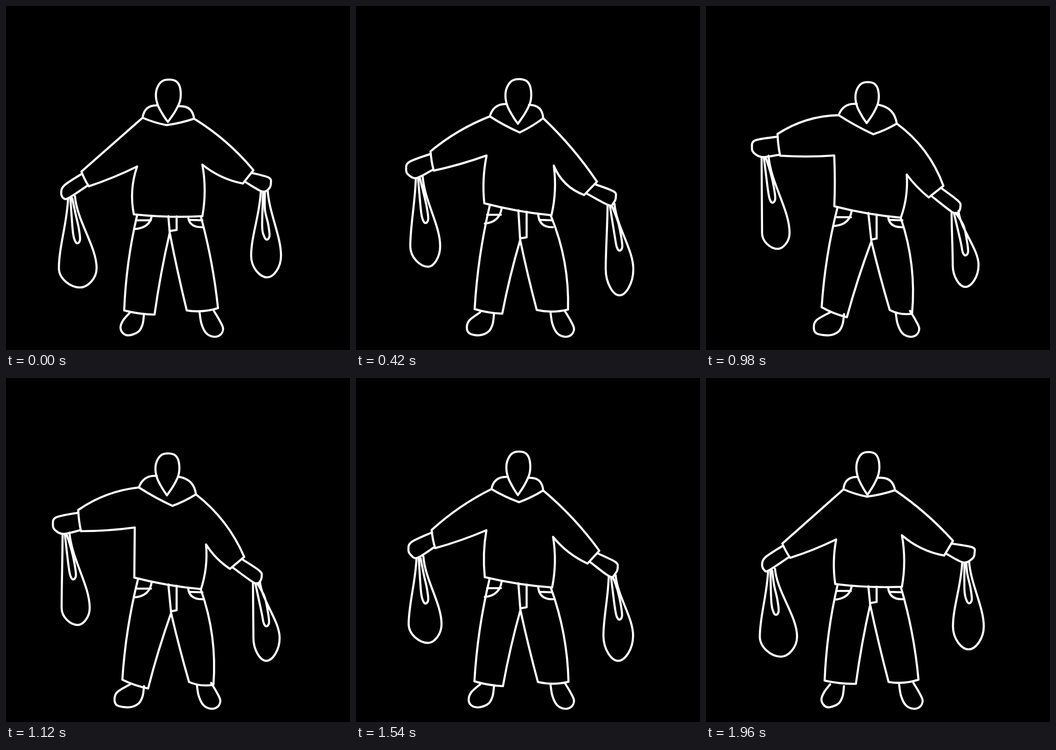
An HTML page with a canvas that plays this animation: 748x748 px, repeating every 2100 ms.

```html
<!DOCTYPE html>
<html>
<head>
<meta charset="utf-8">
<style>
html, body { margin: 0; height: 100%; overflow: hidden; background: #000; }
canvas { display: block; }
</style>
</head>
<body>
<canvas width="748" height="748"></canvas>
<script>
const ctx = document.querySelector("canvas").getContext("2d");
ctx.strokeStyle = "#fff";
ctx.lineWidth = 4.6;
ctx.lineCap = ctx.lineJoin = "round";

const stepMs = 140;
// Tilt per step: 0 is level, 4 a full lean, above 4 slightly past it.
const sway = [1, 2, 2.5, 3, 3.5, 4, 4.2, 4.3, 4, 3.5, 3, 2.5, 2, 1, 0];
let tilt = 0;

// Value at the current tilt, from its values at tilts 0 to 4.
function at(...keys) {
  const i = Math.min(3, Math.floor(tilt));
  return keys[i] + (keys[i + 1] - keys[i]) * (tilt - i);
}
const joint = (xs, ys) => [at(...xs), at(...ys)];
const shift = ([x, y], dx, dy) => [x + dx, y + dy];

// Line from p to q, bowed to the right of travel.
function edge(p, q, bow = 0) {
  const dx = q[0] - p[0], dy = q[1] - p[1], k = 2 * bow / Math.hypot(dx, dy);
  ctx.moveTo(...p);
  ctx.quadraticCurveTo((p[0] + q[0]) / 2 - dy * k, (p[1] + q[1]) / 2 + dx * k, ...q);
}

// Catmull-Rom curve through the points.
function smooth(...points) {
  const near = i => points[Math.max(0, Math.min(points.length - 1, i))];
  ctx.moveTo(...points[0]);
  for (let i = 0; i < points.length - 1; i++) {
    const [a, b, c, d] = [near(i - 1), near(i), near(i + 1), near(i + 2)];
    ctx.bezierCurveTo(
      b[0] + (c[0] - a[0]) / 6, b[1] + (c[1] - a[1]) / 6,
      c[0] - (d[0] - b[0]) / 6, c[1] - (d[1] - b[1]) / 6, ...c);
  }
}

function head() {
  const left = at(327, 326, 329, 325, 325), right = at(376, 379, 376, 380, 376);
  const top = at(161, 160, 161, 159, 164), chin = at(254, 252, 253, 256, 255);
  const p = (u, v) => [left + u * (right - left), top + v * (chin - top)];
  smooth(p(.49, 1), p(.31, .85), p(.09, .62), p(0, .4), p(.05, .2), p(.25, .04),
    p(.56, 0), p(.85, .05), p(1, .22), p(.99, .5), p(.78, .76), p(.49, 1));
}

function hood(left, right) {
  const y = at(215, 216, 217, 213, 213);
  const dip = joint([350, 349, 353, 356, 362], [258, 259, 265, 275, 278]);
  edge([328, y], left, 9);
  edge(left, dip, 1.5);
  edge(dip, right, 1.5);
  edge(right, [376, y + 2], 10);
}

function bag(top, left, right, midY, bottom, handle) {
  const side = ([x, y], wideX) => {
    const h = midY - y;
    ctx.moveTo(x, y);
    ctx.bezierCurveTo(x + .1 * (wideX - x), y + .35 * h, wideX, midY - .3 * h, wideX, midY);
    ctx.bezierCurveTo(wideX, midY + .55 * (bottom[1] - midY),
      bottom[0] + .45 * (wideX - bottom[0]), bottom[1], ...bottom);
  };
  side(shift(top, -2, 1), left);
  side(shift(top, 13, -3), right);
  const h = (dx, dy) => shift(handle, dx, dy);
  smooth(shift(top, 3, 1), h(-10, -29), h(-6, -8), handle,
    h(6, -8), h(3, -34), h(-4, -65), shift(top, 7, 1));
}

function leftHand(cuffTop, cuffEnd) {
  const tip = joint([122, 120, 119, 109, 102], [406, 406, 390, 355, 319]);
  const grip = joint([137, 137, 135, 132, 125], [418, 417, 408, 374, 339]);
  smooth(shift(cuffTop, -1, 6), shift(tip, 7, -16), tip, shift(tip, 5, 12),
    grip, shift(cuffEnd, -2, -2));
  bag(grip, at(117, 115, 111, 118, 121), at(198, 197, 189, 183, 182),
    at(562, 570, 548, 522, 500),
    joint([163, 161, 157, 157, 156], [606, 612, 585, 567, 537]),
    joint([152, 155, 151, 151, 146], [515, 516, 509, 472, 438]));
}

function rightHand(cuffTop, cuffEnd) {
  const tip = joint([584, 576, 573, 565, 556], [380, 385, 409, 415, 431]);
  const grip = joint([559, 556, 554, 549, 539], [401, 403, 430, 433, 445]);
  smooth(shift(cuffTop, -3, 6), shift(tip, -5, -12), tip, shift(tip, -5, 13),
    grip, shift(cuffEnd, 6, -3));
  bag(grip, at(537, 533, 533, 543, 538), at(604, 598, 602, 603, 595),
    at(540, 543, 548, 572, 565),
    joint([571, 568, 567, 573, 566], [590, 590, 601, 629, 615]),
    joint([572, 567, 572, 573, 566], [490, 508, 519, 532, 540]));
}

function jumper(hemL, hemR) {
  const neckL = joint([299, 297, 298, 291, 289], [242, 243, 243, 240, 238]);
  const neckR = joint([411, 409, 407, 407, 413], [244, 245, 245, 244, 253]);
  const cuffL = joint([166, 164, 167, 162, 157], [360, 360, 345, 316, 287]);
  const cuffEndL = joint([183, 180, 175, 169, 163], [391, 392, 382, 358, 333]);
  const cuffR = joint([537, 538, 534, 524, 518], [354, 357, 369, 382, 389]);
  const cuffEndR = joint([518, 515, 511, 496, 487], [386, 386, 396, 411, 415]);
  const pitL = joint([283, 285, 283, 284, 280], [351, 349, 337, 325, 325]);
  const pitR = joint([426, 427, 427, 430, 435], [342, 345, 344, 347, 362]);
  hood(neckL, neckR);
  edge(neckL, cuffL, at(0, 0, 5, 6, 9));
  edge(cuffL, cuffEndL, 1);
  edge(cuffEndL, pitL, 2);
  edge(pitL, hemL, at(4, 7, 3, 4, 0));
  edge(hemL, hemR, 3);
  edge(hemR, pitR, 5);
  edge(pitR, cuffEndR, at(7, 6, 1, 10, 4));
  edge(cuffEndR, cuffR);
  edge(cuffR, neckR, at(5, 7, 6, 5, 11));
  leftHand(cuffL, cuffEndL);
  rightHand(cuffR, cuffEndR);
}

function trousers(hemL, hemR) {
  const waist = x => [x, hemL[1] + (hemR[1] - hemL[1]) * (x - hemL[0]) / (hemR[0] - hemL[0]) + 2];
  const crotch = joint([357, 356, 358, 357, 359], [493, 493, 500, 509, 511]);
  const outerL = joint([258, 257, 257, 258, 253], [658, 662, 660, 659, 656]);
  const innerL = joint([326, 323, 321, 318, 309], [665, 671, 671, 669, 675]);
  const innerR = joint([397, 393, 398, 393, 398], [661, 662, 661, 661, 661]);
  const outerR = joint([462, 461, 463, 461, 451], [656, 657, 661, 660, 667]);
  edge(waist(at(286, 285, 290, 291, 287)), outerL, 5);
  edge(outerL, innerL, 2);
  edge(innerL, crotch, -2);
  edge(crotch, innerR, 1);
  edge(innerR, outerR, 4);
  edge(outerR, waist(424), at(5, 4, 6, 11, 11));

  const flyEnd = [371, crotch[1] - 6];
  edge(waist(353), crotch);
  edge(waist(371), flyEnd);
  edge(flyEnd, shift(crotch, 2, -4));

  const y = at(463, 466, 460, 454, 458);
  edge([285, y], [315, y]);
  ctx.moveTo(...waist(317));
  ctx.quadraticCurveTo(313, y + 16, 280, y + 19);
  edge([398, 465], [427, 466]);
  ctx.moveTo(...waist(396));
  ctx.quadraticCurveTo(398, 482, 428, 481);
}

function feet() {
  const toe = at(251, 249, 249, 241, 236), dx = at(-1, 0, 2, 2, -6);
  smooth([270, 666], [toe + 6, 683], [toe, 699], [toe + 6, 712],
    [268, 716], [288, 708], [297, 692], [300, 670]);
  const p = (x, y) => [x + dx, y];
  smooth(p(421, 667), p(425, 691), p(435, 711), p(451, 719),
    p(466, 715), p(472, 701), p(464, 683), p(452, 663));
}

function tick() {
  tilt = sway[Math.floor(performance.now() / stepMs) % sway.length];
  const hemL = joint([281, 278, 281, 279, 279], [448, 453, 437, 429, 434]);
  const hemR = joint([426, 427, 428, 425, 424], [454, 457, 456, 455, 459]);
  ctx.fillRect(0, 0, 748, 748);
  ctx.beginPath();
  head();
  jumper(hemL, hemR);
  trousers(hemL, hemR);
  feet();
  ctx.stroke();
  requestAnimationFrame(tick);
}
tick();
</script>
</body>
</html>
```
